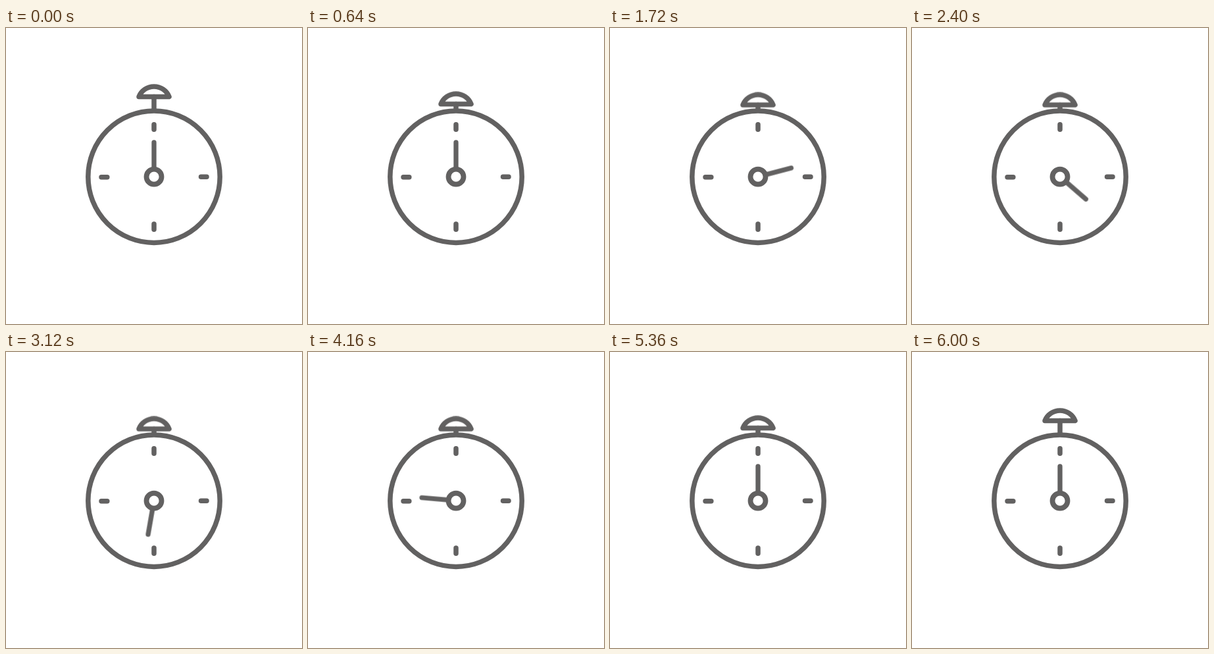
Animation of 450x450 px, one loop 7200 ms. Source, as an HTML page without scripts:

```html
<!DOCTYPE html>
<html lang="en">
<head>
<meta charset="utf-8">
<title>Stopwatch</title>
<style>
  html, body { margin: 0; width: 100%; height: 100%; overflow: hidden; background: #fff; }
  svg { display: block; width: 100%; height: 100%; }
  .ink { fill: none; stroke: #626161; stroke-width: 7.5; stroke-linecap: round; stroke-linejoin: round; }
  .button { animation: press 7.2s infinite; }
  .hand { transform-origin: 225px 226px; animation: sweep 7.2s linear infinite; }

  /* press 0–0.8 s, release 5.2–6 s */
  @keyframes press {
    0% { transform: translateY(0); animation-timing-function: cubic-bezier(.333, 0, .667, 1); }
    11.1111% { transform: translateY(12.4px); animation-timing-function: linear; }
    72.2222% { transform: translateY(12.4px); animation-timing-function: cubic-bezier(.333, 0, .667, 1); }
    83.3333%, 100% { transform: translateY(0); }
  }
  /* one full turn while the button is down */
  @keyframes sweep {
    0%, 11.1111% { transform: rotate(0deg); }
    72.2222%, 100% { transform: rotate(360deg); }
  }
</style>
</head>
<body>
<svg viewBox="0 0 450 450">
  <clipPath id="above"><rect x="190" y="75" width="70" height="51"/></clipPath>
  <g class="ink">
    <g clip-path="url(#above)">
      <g class="button">
        <path d="M225 104.5V126"/>
        <path d="M202 104.5A24.8 24.8 0 0 1 248 104.5Z"/>
      </g>
    </g>
    <circle cx="225" cy="226.2" r="100.2"/>
    <path d="M225 146.8V154.2M225 298V306.2M145 226.8H153.8M296.5 226.2H305"/>
    <path class="hand" d="M225 226V174" stroke-width="7.3"/>
    <circle cx="225" cy="226.2" r="11.5" fill="#fff" stroke-width="7.8"/>
  </g>
</svg>
</body>
</html>
```
